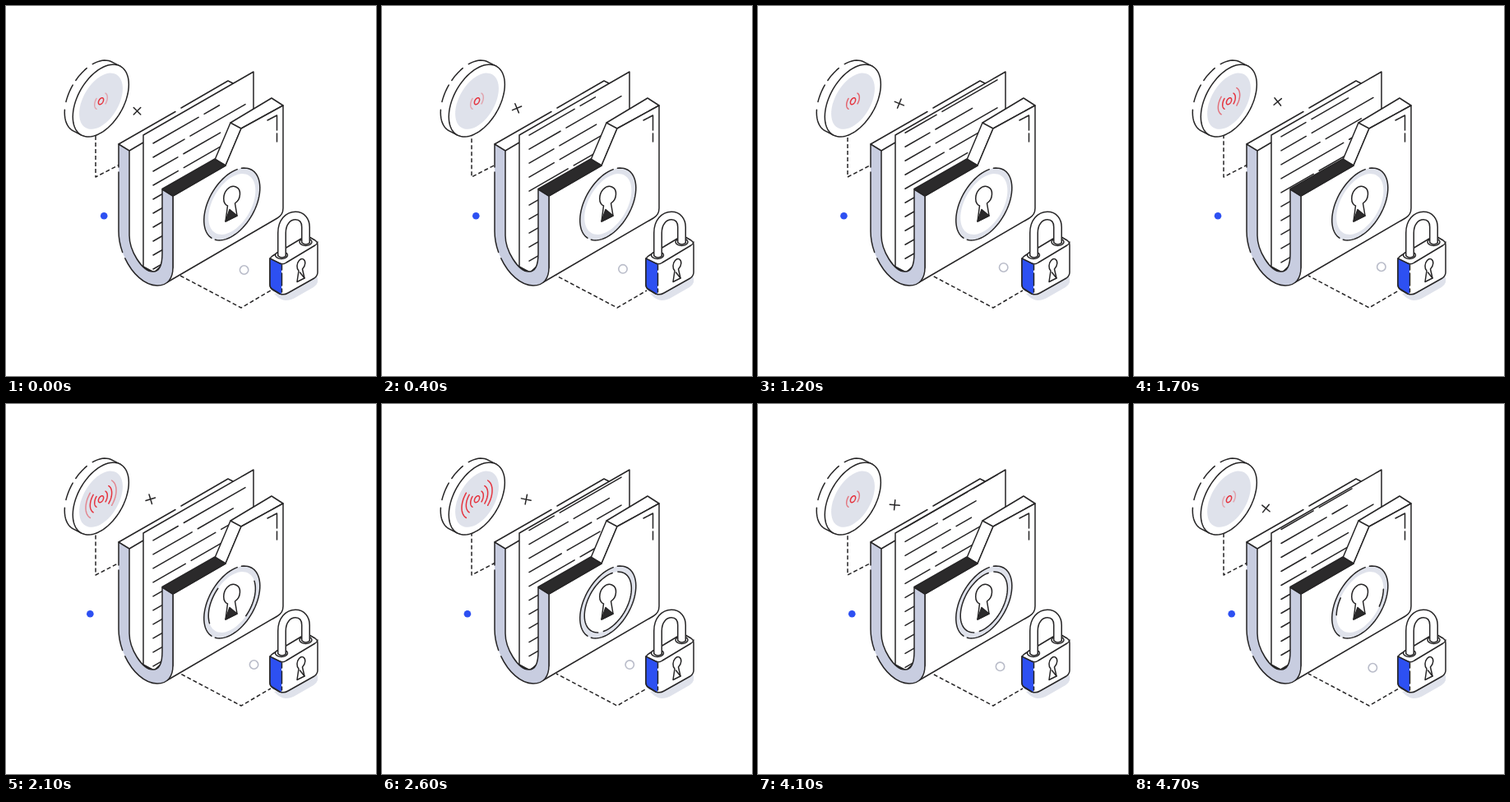
An HTML page for the animation above (4.8 s loop, 450 px wide and 450 px high).

```html
<!DOCTYPE html>
<html lang="en">
<head>
<meta charset="utf-8">
<title>Secure folder</title>
<style>
  html, body { margin: 0; width: 100%; height: 100%; overflow: hidden; background: #fff; }
  svg { display: block; width: 100vw; height: 100vh; }
  .ink { fill: none; stroke: #262526; stroke-width: 1.5; stroke-linejoin: round; stroke-linecap: round; }
  .face { fill: #fff; }
  .lilac { fill: #c8cde0; }
  .pale { fill: #dfe2eb; }
  .dark { fill: #2b2a2b; }
  .blue { fill: #2d50f2; }
  .red { fill: none; stroke: #e5343f; stroke-width: 1.5; stroke-linecap: round; }
  .dash { stroke-dasharray: 5 3; stroke-linecap: butt; }
  .band { stroke-dasharray: 28 6 98 8 2000; }
  .hole { rx: 7.5px; ry: 4.5px; }
  .bar { stroke-width: 11; stroke-linecap: butt; }
  .bar + .bar { stroke: #fff; stroke-width: 8; }
</style>
</head>
<body>
<svg viewBox="0 0 450 450">
  <defs>
    <clipPath id="page"><path d="M167 157L301 80V250L190 315L180 324L167 317Z"/></clipPath>
  </defs>

  <g class="ink">
    <path class="dash" d="M109 158V208L138 193"/>
    <path class="dash" d="M212 328L286 367L322 346"/>
  </g>

  <!-- signal disc -->
  <path id="discEdge" class="ink"/>
  <path id="discRim" class="ink face"/>
  <path id="discPad" class="pale"/>
  <path id="core" class="red"/>
  <g id="waves" class="red"></g>

  <!-- back panel and page -->
  <g class="ink">
    <path d="M137 168L206 128.5M213 124L270 91L277 94.5M150 176L167 166"/>
    <path class="face" d="M167 157L301 80V250L190 315L180 324L167 317Z"/>
  </g>
  <g clip-path="url(#page)"><path id="rows" class="ink"/></g>

  <!-- folder -->
  <g class="ink">
    <path class="face" d="M254 187L273 142L323 112L337 121L286 149L267 194Z"/>
    <path d="M273 142L286 149"/>
    <path class="face" d="M203 231L267 194L286 149L337 121V246Q337 254 330 258L196 336L203 318Z"/>
    <path class="lilac band" d="M137 168V274C137 305 160 340 184 340C197 340 203 331 203 318V231L190 223V301C190 314 187 323 179 323C165 323 150 297 150 279V176Z"/>
    <path class="dark" d="M190 222.5L254 186L267 194L203 231Z"/>
    <path d="M318 139L329.5 133V151M329.5 155V165"/>
  </g>
  <path id="plate" class="pale"/>
  <path id="plateIn" class="face"/>
  <path id="plateRim" class="ink"/>
  <path id="plateTrim" class="ink"/>
  <g class="ink">
    <path class="face" d="M269.5 243C263 240 263.5 229 269 223C276 216 285 220 284.5 229C284.3 234 281.5 238 278.5 240L281 255L267 262Z"/>
    <path class="dark" d="M272 247.5L281 255L267 262Z"/>
  </g>

  <!-- padlock -->
  <path class="pale" d="M326 350Q334 358 340 358Q347 358 353 354L374 342Q382 337 378 328L340 346Z"/>
  <g class="ink">
    <path class="face" d="M324 304L359 283Q364 278 369 281L376 285Q379 287 379 291V324Q379 328 375 331L343 349Q338 352 333 350L324 345Q321 343 321 339V309Q321 306 324 304Z"/>
    <path class="blue" stroke="none" d="M321 307L335 313V350L325 346Q321 343 321 339Z"/>
    <path d="M321 307L333 313Q337 315 341 312L376 291Q379 289 379 287"/>
    <path d="M335.5 315V321M335.5 325V340M335.5 344V348"/>
    <path d="M321 307V339Q321 343 325 345L333 350"/>
    <ellipse class="face hole" cx="335" cy="303"/>
    <ellipse class="face hole" cx="364.5" cy="287"/>
    <path class="bar" d="M335.5 304V276C335.5 263 343 255 352 255C360 255 364.5 261 364.5 269V288"/>
    <path class="bar" d="M335.5 305V276C335.5 263 343 255 352 255C360 255 364.5 261 364.5 269V289"/>
    <path d="M331 304Q335.5 308 340.5 304M360 288Q364.5 292 369.5 288"/>
    <path class="face" d="M356 322C353 319 353.5 313 356.5 309.5C360 305.5 364 308 363.8 313C363.6 316 362 318.5 360.5 320L363 331L354 335.5Z"/>
    <path d="M357.5 324L363 331"/>
  </g>

  <circle id="dot" class="blue" cy="255.3" r="4.3"/>
  <circle id="ring" r="5.2" fill="#fff" stroke="#b9bcc9" stroke-width="1.6"/>
  <path id="cross" class="ink" d="M-6 0H6M0 -6V6"/>
</svg>
<script>
const LOOP = 4800, STEP = 100;
const ROW_GAP = 17, ROW_COUNT = 7, SLOPE = 0.575, MARGIN = 179;
const $ = id => document.getElementById(id);
const draw = (id, d) => $(id).setAttribute('d', d);
const clamp = x => Math.min(1, Math.max(0, x));
const ramp = (t, from, to) => clamp((t - from) / (to - from));
const noise = n => Math.abs(Math.sin(n * 12.99 + 4.1) * 43758.5) % 1;

// Point of a circle on the right-hand isometric plane, angle in degrees
function isoPoint([cx, cy], r, deg) {
  const a = deg * Math.PI / 180, x = r * Math.cos(a), y = r * Math.sin(a);
  return `${(cx + 0.866 * x).toFixed(2)} ${(cy - 0.5 * x + y).toFixed(2)}`;
}

function isoArc(c, r, from = 0, to = 360) {
  const n = Math.max(2, Math.ceil((to - from) / 5));
  const points = Array.from({ length: n + 1 }, (_, i) => isoPoint(c, r, from + (to - from) * i / n));
  return 'M' + points.join('L');
}

// Out to 1 at the peak with a soft turn, then back to 0 at the loop's end
function swing(t, peak) {
  const u = t < peak ? t / peak : (LOOP - t) / (LOOP - peak);
  return Math.sin(u * Math.PI / 2);
}

const DISC = [115.3, 115.1], DISC_BACK = [105.3, 110], DISC_R = 39.3;
const SIGNAL = [115.5, 115.7];
const PLATE = [274.8, 241], PLATE_R = 39.3, PLATE_IN = 33;

const edge = [[135, 185], [198, 225], [233, 258], [270, 315]]
  .map(([a, b]) => isoArc(DISC_BACK, DISC_R, a, b)).join('');
const joins = [135, 315]
  .map(a => `M${isoPoint(DISC_BACK, DISC_R, a)}L${isoPoint(DISC, DISC_R, a)}`).join('');
draw('discEdge', edge + joins);
draw('discRim', isoArc(DISC, DISC_R));
draw('discPad', isoArc(SIGNAL, 30.5));
draw('core', isoArc(SIGNAL, 3.6));
draw('plate', isoArc(PLATE, PLATE_R));
draw('plateIn', isoArc(PLATE, PLATE_IN));
draw('plateRim', isoArc(PLATE, PLATE_R, -70, 127) + isoArc(PLATE, PLATE_R, 137, 281));

const waves = [0, 1, 2].map(i => {
  const p = document.createElementNS('http://www.w3.org/2000/svg', 'path');
  const r = 9 + 6.2 * i;
  p.setAttribute('d', isoArc(SIGNAL, r, -45, 45) + isoArc(SIGNAL, r, 135, 225));
  return $('waves').appendChild(p);
});
const dashes = document.querySelectorAll('.dash');

// Each row is one line of text with a break; every other one stops short
function rowSpans(n) {
  const cut = 204 + 52 * noise(n);
  const end = n % 2 ? 291 : 258 + 30 * noise(n + 20);
  return [[MARGIN, cut], [cut + 7, end]];
}

function pageRows(t) {
  const scroll = t / LOOP * ROW_COUNT, first = Math.floor(scroll);
  let d = '';
  for (let i = first; i < first + 11; i++) {
    const y = 150 + ROW_GAP * (i + 1 - scroll);
    for (const [a, b] of rowSpans(i % ROW_COUNT)) {
      d += `M${a} ${y - (a - MARGIN) * SLOPE}L${b} ${y - (b - MARGIN) * SLOPE}`;
    }
  }
  return d;
}

function render(t) {
  const k = swing(t, 2200);
  $('dot').setAttribute('cx', 119.2 - 17.2 * swing(t, 1750) ** 1.2);
  $('ring').setAttribute('cx', 289.6 + 12 * k);
  $('ring').setAttribute('cy', 321 - 4 * k);
  $('cross').setAttribute('transform',
    `translate(${159.5 + 16.3 * k} ${127.7 - 12 * k}) rotate(${45 + 270 * t / LOOP})`);

  const half = 83 * (ramp(t, 1800, 2500) - ramp(t, 4100, 4850));
  draw('plateTrim', half > 0 && [18, 198].map(a => isoArc(PLATE, PLATE_IN, a - half, a + half)).join('') || '');

  const level = 0.35 + 2.7 * Math.cos(Math.PI * (t - 2600) / LOOP) ** 4;
  waves.forEach((p, i) => { p.style.opacity = clamp(level - i); });
  dashes.forEach(p => { p.style.strokeDashoffset = -40 * t / LOOP; });
  draw('rows', pageRows(t));
}

const start = performance.now();
function tick() {
  const t = (performance.now() - start) % LOOP;
  render(Math.floor(t / STEP) * STEP);
  requestAnimationFrame(tick);
}
tick();
</script>
</body>
</html>
```
